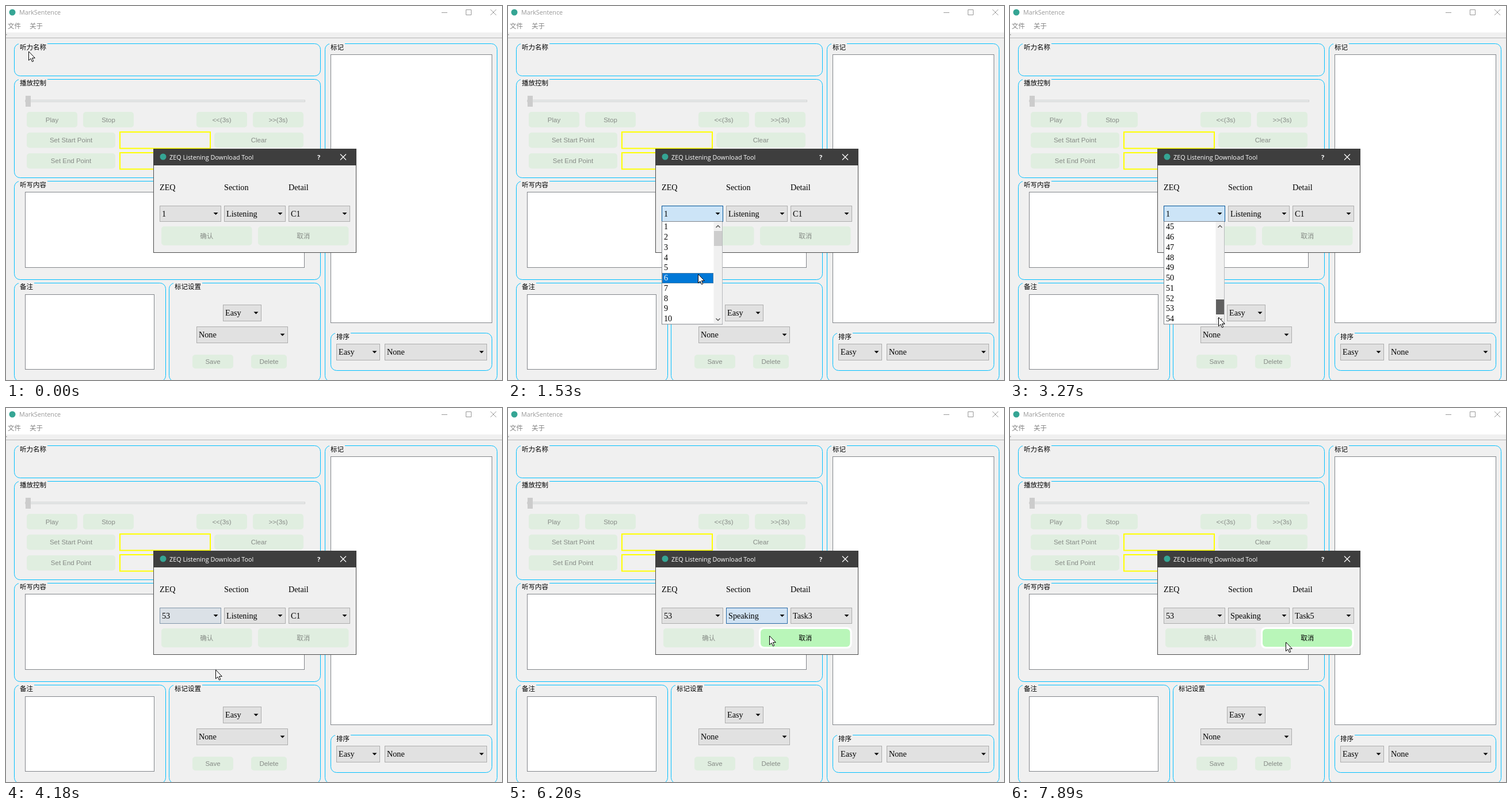
These frames come from a looping animation (862 px wide and 650 px high, 8 s). An HTML page:

```html
<!DOCTYPE html>
<html lang="zh">
<head>
<meta charset="utf-8">
<title>MarkSentence</title>
<style>
  html, body { margin: 0; width: 100%; height: 100%; overflow: hidden; background: #f0f0f0; }
  svg { display: block; }
  .serif { font: 14.2px "Liberation Serif", "Times New Roman", serif; }
  .ui { font: 10.8px "Open Sans", sans-serif; }
  .help { font: bold 11px "Open Sans", sans-serif; }
  .btn { font: 11.5px "Liberation Sans", "Noto Sans CJK SC", sans-serif; text-anchor: middle; }
  .cjk { font: 11.5px "Noto Sans CJK SC", "Noto Sans CJK", sans-serif; }
</style>
</head>
<body>
<svg width="862" height="650" viewBox="0 0 862 650"><g id="base"></g><g id="live"></g></svg>
<script>
// The screen is sampled in steps; all times below count steps.
const LOOP = 8000, STEP = 117, LEAD = 30;
const ROW = 17.75, LIST_TOP = 375.4, COMBO_Y = 347, COMBO_W = 106;

// Pointer stops: [arrive, leave, x, y]
const STOPS = [
  [0, 0, 39, 79], [7, 10, 338, 370], [14, 14, 328, 484], [16, 16, 352, 468],
  [18, 18, 367, 406], [28, 29, 362, 541], [32, 32, 328, 525], [37, 37, 384, 417],
  [40, 41, 419, 364], [46, 53, 454, 396], [57, 57, 536, 376], [61, 63, 540, 412], [67, 99, 479, 407]
];

const COMBOS = [
  { x: 267, open: 8, close: 33, before: '1', after: '53', items: Array.from({ length: 54 }, (_, i) => i + 1) },
  { x: 379, open: 40, close: 53, before: 'Listening', after: 'Speaking', items: ['Listening', 'Speaking', 'Writing'] },
  { x: 491, open: 57, close: 64, before: 'Task3', after: 'Task5', items: [3, 4, 5, 6].map(n => 'Task' + n) }
];

const clamp = (v, lo = 0, hi = 1) => Math.min(hi, Math.max(lo, v));
const smooth = k => k * k * (3 - 2 * k);
const lerp = (a, b, k) => a + (b - a) * k;
const mix = (a, b, k) => `rgb(${a.map((v, i) => Math.round(lerp(v, b[i], k)))})`;

const rect = (x, y, w, h, fill, r = 0) =>
  `<rect x="${x}" y="${y}" width="${w}" height="${h}" rx="${r}" fill="${fill}"/>`;
const frame = (x, y, w, h, fill, stroke, r = 0, extra = '') =>
  `<rect x="${x + .5}" y="${y + .5}" width="${w}" height="${h}" rx="${r}" fill="${fill}" stroke="${stroke}" ${extra}/>`;
const line = (d, color, width = 1) => `<path d="${d}" fill="none" stroke="${color}" stroke-width="${width}"/>`;
const text = (x, y, s, cls, fill = '#000') => `<text x="${x}" y="${y}" class="${cls}" fill="${fill}">${s}</text>`;
const dot = (x, y) => `<circle cx="${x}" cy="${y}" r="5.5" fill="#35a594"/>`;
const edit = (x, y, w, h) => frame(x, y, w, h, '#fff', '#82858a');

function group(title, x, y, w, h) {
  return frame(x, y, w, h, 'none', '#00bfff', 10) +
    rect(x + 8, y - 1, title.length * 11.5 + 4, 4, '#f0f0f0') + text(x + 10, y + 10.5, title, 'cjk');
}

function button(label, x, y, w, h, hot) {
  const shape = hot
    ? rect(x - 2, y - 2, w + 4, h + 4, '#fff', 8) + rect(x + 1, y + 1, w - 2, h - 2, '#b9f6b9', 6)
    : rect(x, y, w, h, '#e0eee0', 5);
  return shape + text(x + w / 2, y + h / 2 + 4.2, label, 'btn', hot ? '#000' : '#858a85');
}

function combo(label, x, y, w, fill = '#e1e1e1', stroke = '#adadad', h = 28) {
  return frame(x, y, w, h, fill, stroke) + text(x + 4, y + h / 2 + 5.3, label, 'serif') +
    `<path d="M${x + w - 12.5} ${y + h / 2 - 1.5}h8l-4 4z"/>`;
}

function drawWindow() {
  return rect(0, 0, 862, 46, '#fff') + line('M0 55.5H862', '#b4b4b4') + rect(0, 49, 1.5, 1.5, '#999') +
    dot(11, 11) + text(23, 15, 'MarkSentence', 'ui', '#999') +
    line('M757 11.5h10M799.5 6.5h9v9h-9zM842 6l10 10m0-10l-10 10', '#999') +
    text(3, 39, '文件', 'cjk', '#808080') + text(41, 39, '关于', 'cjk', '#808080');
}

function drawPanels() {
  return group('听力名称', 14, 65, 532, 56) +
    group('播放控制', 14, 127, 532, 171) + group('听写内容', 14, 304, 532, 171) +
    group('备注', 14, 481, 263, 171) + group('标记设置', 283, 481, 263, 171) +
    group('标记', 554, 65, 299, 587) + group('排序', 564, 568, 280, 65) +
    edit(33, 323, 485, 131) + edit(33, 501, 224, 130) + edit(564, 84, 280, 466);
}

function drawControls() {
  const player = [['Play', 36], ['Stop', 134], ['&lt;&lt;(3s)', 331], ['&gt;&gt;(3s)', 429]];
  return frame(33, 163, 486, 3, '#e7eaea', '#d4d4d4') + rect(34, 156, 9, 19, '#ccc') +
    player.map(([label, x]) => button(label, x, 184, 88, 27)).join('') +
    ['Start', 'End'].map((name, i) => {
      const y = 220 + 36 * i;
      return button(`Set ${name} Point`, 36, y, 154, 26.5) +
        frame(197.5, y - 1.5, 157, 28.5, 'none', '#ff0', 0, 'stroke-width="2"');
    }).join('') +
    button('Clear', 362, 220, 155, 26) +
    combo('Easy', 377, 519, 66) + combo('None', 331, 557, 158) +
    combo('Easy', 574, 587, 75) + combo('None', 658, 587, 177) +
    button('Save', 324, 606, 71, 24) + button('Delete', 426, 606, 62, 24);
}

function drawDialog() {
  return frame(256, 248, 352, 180, '#f0f0f0', '#4a4a4a') + rect(256, 248, 353, 29, '#3e3e3e') +
    dot(273, 262) + text(284, 267, 'ZEQ Listening Download Tool', 'ui', '#fff') +
    text(541, 267, '?', 'help', '#fff') + line('M581 257.5l10 10m0-10l-10 10', '#fff', 1.2) +
    ['ZEQ', 'Section', 'Detail'].map((s, i) => text(COMBOS[i].x, 320, s, 'serif')).join('');
}

function popup(x, items, first, active, rowWidth) {
  const shown = items.slice(first, first + 10);
  return frame(x, 374, COMBO_W - 1, shown.length * ROW + 1, '#fff', '#80848a') + shown.map((s, i) => {
    const y = Math.round(LIST_TOP + i * ROW), on = first + i === active;
    const bar = rect(x + 1, y, rowWidth, 18, '#0078d7') +
      frame(x + 1, y, rowWidth - 1, 17, 'none', '#e08a3c', 0, 'stroke-dasharray="1 1" stroke-opacity=".6"');
    return (on ? bar : '') + text(x + 4, y + 13.4, s, 'serif', on ? '#fff' : '#000');
  }).join('');
}

function scrollbar(step, pos) {
  const thumb = step < 18 ? '#cdcdcd' : step < 19 ? '#c1c1c1' : step < 30 ? '#606060' : '#a6a6a6';
  return rect(357.5, 375.5, 15, 177, '#f0f0f0') + rect(358, 391 + 119 * pos, 14, 26, thumb) +
    line('M361.5 385l3.5-3.5 3.5 3.5M361.5 543l3.5 3.5 3.5-3.5', '#555', 1.4);
}

function pointer(x, y) {
  return `<path transform="translate(${x + .5} ${y})" fill="#fff" stroke="#000" stroke-linejoin="round"
    d="M0 0V15.5L3.5 12.3 6 17.8 8.3 16.8 5.9 11.4H10.8Z"/>`;
}

function pointerAt(step) {
  const i = STOPS.findIndex(s => step <= s[1]);
  const [arrive, , x, y] = STOPS[i];
  if (step >= arrive) return [x, y];
  const [, leave, x0, y0] = STOPS[i - 1], k = smooth((step - leave) / (arrive - leave));
  return [Math.round(lerp(x0, x, k)), Math.round(lerp(y0, y, k))];
}

function comboColors(step, c, hover) {
  if (step >= c.open && step < c.close) return ['#cce4f7', '#005499'];
  if (hover) return ['#e5f1fb', '#0078d7'];
  const k = step < c.close ? 1 : clamp((step - c.close) / 3);
  return [mix([208, 226, 243], [225, 225, 225], k), mix([40, 105, 165], [173, 173, 173], k)];
}

function openList(step, c, x, y) {
  const long = c.items.length > 10;
  const pos = !long || step < 18 ? 0 : step < 29 ? clamp((y - 406) / 119) : 1;
  const first = Math.round(pos * Math.max(0, c.items.length - 10));
  const row = first + clamp(Math.floor((y - LIST_TOP) / ROW), 0, 9);
  // over the scrollbar the last touched row stays selected
  const active = long && x >= 357 ? 5 : row;
  return popup(c.x, c.items, first, active, long ? 89 : COMBO_W - 2) + (long ? scrollbar(step, pos) : '');
}

function drawLive(step) {
  const [x, y] = pointerAt(step);
  const open = COMBOS.find(c => step >= c.open && step < c.close);
  const over = (bx, by, w, h) => !open && x >= bx && x <= bx + w && y >= by && y <= by + h;
  const buttons = [['确认', 270], ['取消', 438]].map(([label, bx]) =>
    button(label, bx, 383, 157.5, 33, over(bx, 383, 157, 33)));
  const combos = COMBOS.map((c, i) => {
    const listening = i === 2 && step < COMBOS[1].close;
    const label = listening ? 'C1' : step < c.close ? c.before : c.after;
    const [fill, stroke] = comboColors(step, c, over(c.x, COMBO_Y, COMBO_W, 28));
    return combo(label, c.x, COMBO_Y, COMBO_W, fill, stroke, 27);
  });
  return [...buttons, ...combos, open ? openList(step, open, x, y) : '', pointer(x, y)].join('');
}

document.getElementById('base').innerHTML = drawWindow() + drawPanels() + drawControls() + drawDialog();
const live = document.getElementById('live');
const start = performance.now();
let last = -1;
function tick() {
  const t = (performance.now() - start) % LOOP;
  const step = Math.floor((t + LEAD) / STEP);
  if (step !== last) live.innerHTML = drawLive(last = step);
  requestAnimationFrame(tick);
}
tick();
</script>
</body>
</html>
```
